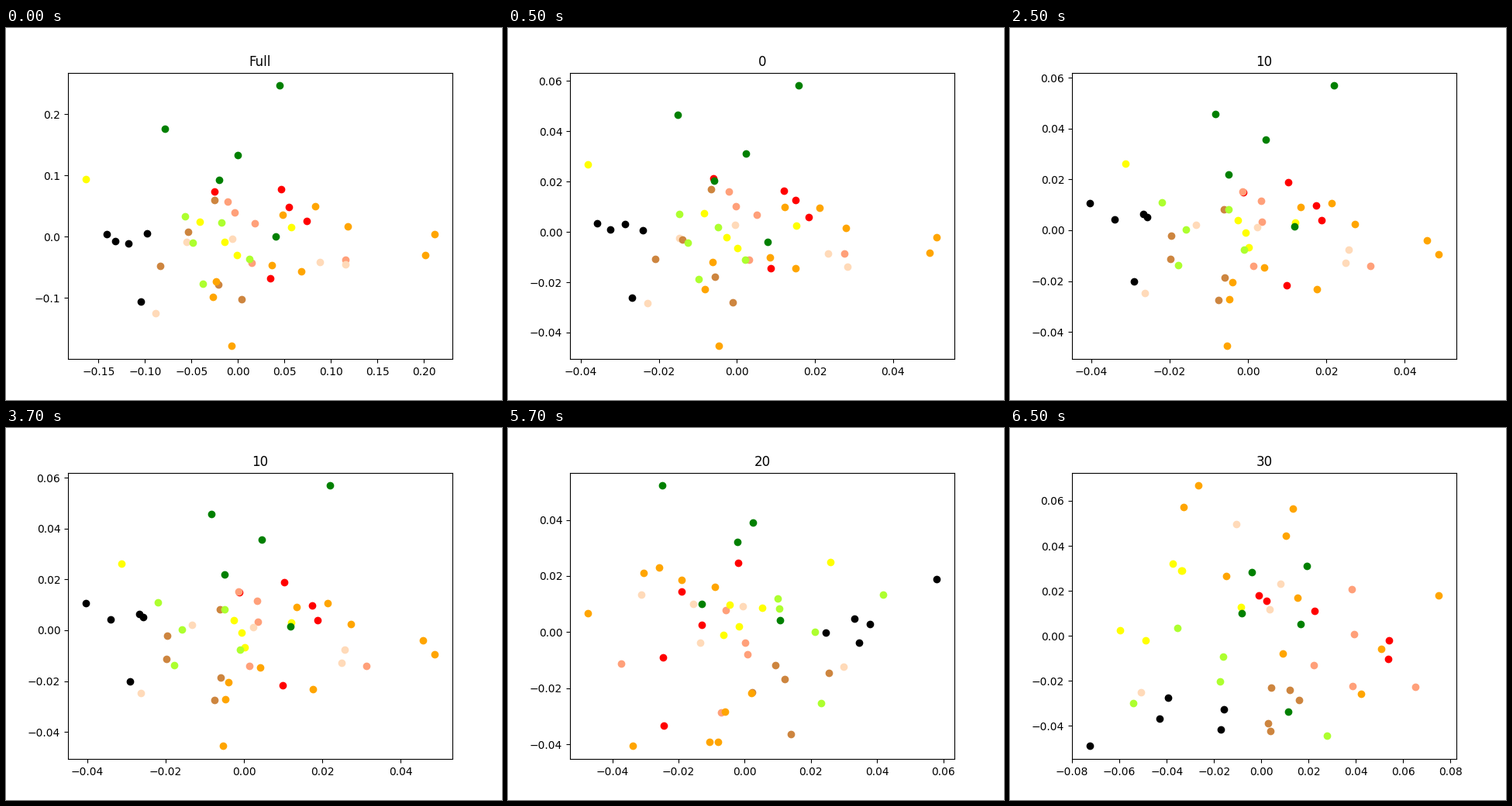
A matplotlib script for the animation above (8 s loop, 640 px wide and 480 px high).

```python
import matplotlib.pyplot as plt
import numpy as np
from matplotlib.animation import FuncAnimation

WIDTH, HEIGHT, DPI = 640, 480, 100
LEFT, RIGHT, TOP, BOTTOM = 80, 576, 57.6, 427.2  # axes box, stage pixels
INTERVAL = 500
FRAMES = 16

plots = []


def add_plot(title, origin, scale, **groups):
    """Store a scatter plot; groups hold stage positions, drawn in order."""
    origin, scale = np.array(origin), np.array(scale) * (1, -1)

    def to_data(points):
        return (np.array(points) - origin) / scale

    limits = to_data([(LEFT, BOTTOM), (RIGHT, TOP)])
    data = {color: to_data(points) for color, points in groups.items()}
    plots.append((title, limits, data))


add_plot(
    "Full", (299.3, 269.3), (1200, 791),
    red=[(269, 211), (355, 208), (365, 231), (388, 249), (341, 323)],
    lightsalmon=[(286, 224), (295, 238), (321, 252), (317, 303), (438, 299)],
    peachpuff=[(233, 276), (292, 272), (405, 302), (438, 305), (193, 368)],
    peru=[(269, 222), (235, 263), (199, 307), (274, 331), (304, 350)],
    orange=[(399, 230), (357, 241), (441, 256), (553, 266), (541, 293),
            (343, 306), (381, 314), (271, 327), (267, 347), (291, 410)],
    yellow=[(103, 195), (250, 250), (368, 257), (282, 276), (298, 293)],
    greenyellow=[(231, 243), (278, 251), (241, 277), (254, 330), (314, 298)],
    green=[(353, 74), (205, 130), (299, 164), (275, 196), (348, 269)],
    black=[(130, 266), (141, 275), (158, 278), (182, 265), (174, 353)],
)
add_plot(
    "0", (295.3, 263), (5040, 3250),
    red=[(265, 194), (356, 210), (371, 222), (388, 244), (339, 310)],
    lightsalmon=[(285, 211), (294, 230), (321, 241), (311, 299), (434, 291)],
    peachpuff=[(221, 271), (293, 254), (413, 291), (438, 308), (180, 355)],
    peru=[(262, 208), (225, 273), (190, 298), (267, 321), (290, 354)],
    orange=[(402, 232), (357, 231), (436, 258), (553, 270), (544, 290),
            (338, 296), (371, 310), (264, 302), (254, 337), (272, 410)],
    yellow=[(103, 176), (253, 239), (372, 255), (282, 270), (296, 284)],
    greenyellow=[(221, 240), (271, 257), (232, 277), (246, 324), (306, 299)],
    green=[(375, 74), (219, 112), (307, 162), (266, 197), (335, 276)],
    black=[(115, 252), (132, 260), (151, 253), (174, 261), (160, 348)],
)
add_plot(
    "10", (307.2, 261), (5055, 3280),
    red=[(301, 212), (359, 199), (395, 229), (402, 248), (357, 332)],
    lightsalmon=[(300, 211), (324, 223), (325, 250), (314, 307), (465, 307)],
    peachpuff=[(240, 254), (319, 257), (437, 286), (433, 303), (174, 342)],
    peru=[(276, 234), (208, 268), (207, 298), (277, 322), (269, 351)],
    orange=[(415, 226), (375, 231), (445, 253), (538, 274), (553, 292),
            (328, 309), (396, 337), (287, 328), (283, 350), (280, 410)],
    yellow=[(149, 175), (294, 248), (368, 251), (304, 264), (308, 283)],
    greenyellow=[(196, 225), (282, 234), (227, 260), (217, 306), (302, 286)],
    green=[(418, 74), (265, 111), (330, 144), (282, 189), (367, 256)],
    black=[(103, 226), (135, 247), (172, 240), (177, 244), (160, 327)],
)
add_plot(
    "20", (305.3, 263.4), (4270, 3620),
    red=[(297, 174), (224, 211), (250, 254), (200, 296), (201, 384)],
    lightsalmon=[(281, 235), (306, 277), (309, 292), (275, 367), (146, 304)],
    peachpuff=[(172, 215), (239, 227), (303, 230), (248, 277), (433, 308)],
    peru=[(345, 306), (357, 324), (414, 316), (365, 395), (315, 341)],
    orange=[(103, 239), (175, 187), (195, 180), (224, 196), (267, 205),
            (161, 410), (260, 405), (271, 405), (280, 366), (314, 342)],
    yellow=[(416, 173), (286, 228), (328, 232), (298, 256), (278, 267)],
    greenyellow=[(348, 220), (350, 233), (484, 215), (396, 263), (404, 355)],
    green=[(199, 74), (316, 122), (296, 147), (250, 227), (351, 248)],
    black=[(553, 195), (447, 246), (467, 253), (410, 264), (453, 277)],
)
add_plot(
    "30", (324.2, 268.2), (3050, 2905),
    red=[(321, 216), (331, 223), (393, 236), (489, 274), (488, 298)],
    lightsalmon=[(441, 208), (444, 266), (392, 306), (442, 333), (523, 334)],
    peachpuff=[(292, 124), (349, 201), (335, 234), (169, 341)],
    peru=[(337, 335), (361, 338), (373, 351), (333, 381), (336, 391)],
    orange=[(243, 74), (224, 102), (365, 104), (356, 139), (279, 191),
            (371, 219), (553, 216), (479, 285), (352, 291), (453, 343)],
    yellow=[(210, 175), (221, 184), (222, 184), (298, 231), (142, 261),
            (175, 274)],
    greenyellow=[(216, 258), (275, 295), (271, 327), (159, 355), (409, 397)],
    green=[(383, 178), (312, 186), (299, 239), (375, 253), (359, 366)],
    black=[(103, 410), (204, 348), (276, 363), (193, 375), (272, 389)],
)

fig, ax = plt.subplots(figsize=(WIDTH / DPI, HEIGHT / DPI), dpi=DPI)
fig.subplots_adjust(left=LEFT / WIDTH, right=RIGHT / WIDTH,
                    bottom=1 - BOTTOM / HEIGHT, top=1 - TOP / HEIGHT)


def draw(frame):
    # The first plot stays for one frame, the others for four.
    title, limits, data = plots[(frame + 3) // 4]
    ax.clear()
    ax.set_title(title)
    for color, points in data.items():
        ax.scatter(*points.T, color=color)
    ax.set_xlim(limits[:, 0])
    ax.set_ylim(limits[:, 1])


animation = FuncAnimation(fig, draw, frames=FRAMES, interval=INTERVAL,
                          init_func=lambda: draw(0), repeat=True,
                          repeat_delay=0)
plt.show()
```
